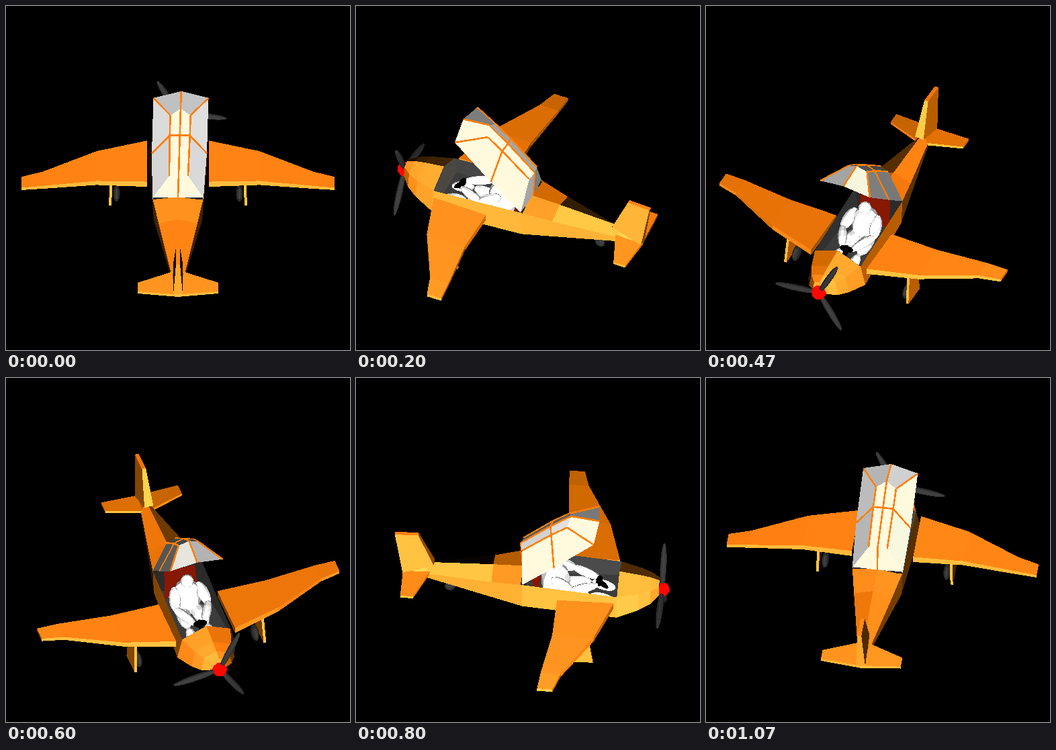
Write an HTML page with a canvas that moves like this. It is 512 px wide and 512 px high and loops after 1140 ms.

```html
<!DOCTYPE html>
<html lang="en">
<head>
<meta charset="utf-8">
<title>Turning plane</title>
<style>
html, body { margin: 0; height: 100%; overflow: hidden; background: #000; }
canvas { display: block; width: 100%; height: 100%; }
</style>
</head>
<body>
<canvas width="512" height="512"></canvas>
<script>
// Points are [x right, f forward, z up]; the camera is orthographic, about 44 degrees up.
const SIZE = 512, LOOP = 1140, STEP_DEG = 22;
const ctx = document.querySelector('canvas').getContext('2d');
const img = ctx.createImageData(SIZE, SIZE);
const pixels = new Uint32Array(img.data.buffer);
const depth = new Float32Array(SIZE * SIZE);
let sin, cos;

const view = ([x, f, z]) => {
  const d = x * sin + f * cos;
  return [256 + x * cos - f * sin, 297 - .7 * d - .714 * z, .7 * z - .714 * d];
};
const sub = (a, b) => a.map((v, i) => v - b[i]);
const cross = (a, b) => [a[1] * b[2] - a[2] * b[1], a[2] * b[0] - a[0] * b[2], a[0] * b[1] - a[1] * b[0]];
const mix = (a, b, k) => a.map((v, i) => v + (b[i] - v) * k);
const unit = v => { const l = Math.hypot(...v); return v.map(n => n / l); };
const byte = v => Math.max(0, Math.min(255, v)) | 0;

// Materials: light 0..1 and whether the inner side shows, giving [r, g, b]
const flat = (...rgb) => () => rgb;
const grey = g => [g, g, g];
const orange = k => [k * 480, 222 * Math.max(0, k) ** .9, (k - .43) * 150];
const hull = (k, inside) => inside ? grey(28 + 60 * k) : orange(k);
const glass = (k, inside) => {
  const g = 38 + 225 * Math.min(1, inside ? k + .3 : k) ** 1.6;
  return [g, Math.min(g, 250), Math.min(g, 222)];
};
const white = k => grey(90 + 290 * k);
const dark = k => grey(18 + 50 * k);
const black = flat(0, 0, 0), red = flat(255, 8, 4), rib = flat(255, 128, 8);

function triangle(a, b, c, color) {
  const area = (b[0] - a[0]) * (c[1] - a[1]) - (b[1] - a[1]) * (c[0] - a[0]);
  if (Math.abs(area) < .01) return;
  const xs = [a[0], b[0], c[0]], ys = [a[1], b[1], c[1]];
  const x1 = Math.min(SIZE - 1, Math.max(...xs)), y1 = Math.min(SIZE - 1, Math.max(...ys));
  for (let y = Math.max(0, Math.floor(Math.min(...ys))); y <= y1; y++) {
    for (let x = Math.max(0, Math.floor(Math.min(...xs))); x <= x1; x++) {
      const px = x + .5, py = y + .5;
      const u = ((px - a[0]) * (c[1] - a[1]) - (py - a[1]) * (c[0] - a[0])) / area;
      const v = ((b[0] - a[0]) * (py - a[1]) - (b[1] - a[1]) * (px - a[0])) / area;
      if (u < 0 || v < 0 || u + v > 1) continue;
      const d = a[2] + u * (b[2] - a[2]) + v * (c[2] - a[2]), at = y * SIZE + x;
      if (d > depth[at]) { depth[at] = d; pixels[at] = color; }
    }
  }
}

function fill(v, rgb) {
  const [r, g, b] = rgb.map(byte);
  const color = (255 << 24 | b << 16 | g << 8 | r) >>> 0;
  for (let i = 2; i < v.length; i++) triangle(v[0], v[i - 1], v[i], color);
}

// The light stands a little below the camera
function face(points, material) {
  const v = points.map(view);
  const n = cross(sub(v[2], v[0]), sub(v[v.length - 1], v[1]));
  const len = Math.hypot(...n);
  if (len < .01) return;
  const light = (n[1] * .2 + n[2] * .98) * Math.sign(n[2]) / len;
  fill(v, material(Math.max(0, light), n[2] < 0));
}

function line(p, q, width, material) {
  const a = view(p), b = view(q);
  const dx = b[0] - a[0], dy = b[1] - a[1], k = width / 2 / (Math.hypot(dx, dy) || 1);
  const off = ([x, y, d], s) => [x - dy * k * s, y + dx * k * s, d + 2.5];
  fill([off(a, 1), off(b, 1), off(b, -1), off(a, -1)], material());
}

// Skin stretched over a row of rings
function loft(rings, material, closed = true) {
  for (let i = 1; i < rings.length; i++) {
    const a = rings[i - 1], b = rings[i], n = a.length;
    for (let j = 0; j < n - !closed; j++) {
      const k = (j + 1) % n;
      face([a[j], a[k], b[k], b[j]], material);
    }
  }
}

function solid(rings, material) {
  loft(rings, material);
  face(rings[0], material);
  face(rings[rings.length - 1], material);
}

// Ellipsoid from a to b
function blob(a, b, r, material, sides = 10) {
  const dir = unit(sub(b, a));
  const u = unit(cross(dir, Math.abs(dir[2]) > .9 ? [1, 0, 0] : [0, 0, 1])), w = cross(dir, u);
  const rings = Array.from({ length: 8 }, (_, i) => {
    const phi = i / 7 * Math.PI, c = mix(a, b, (1 - Math.cos(phi)) / 2);
    return Array.from({ length: sides }, (_, j) => {
      const t = j / sides * 2 * Math.PI;
      return c.map((v, m) => v + r * Math.sin(phi) * (u[m] * Math.cos(t) + w[m] * Math.sin(t)));
    });
  });
  loft(rings, material);
}

// Hull cross-section: the nose swells quickly, the tail tapers evenly
function section(f) {
  const nose = f > 0;
  const k = nose ? ((200 - f) / 63) ** .45 : (f + 200) / 195;
  const w = 38 * k, low = w * (nose ? 1.2 : .95), base = -25 * k;
  const sill = nose ? 10 : 21 * k ** 1.6;
  const ridge = nose ? 10 + 17 * k : 24 * k ** .25;
  return [[0, f, ridge], [w, f, sill], [low, f, base], [-low, f, base], [-w, f, sill]];
}

function body() {
  const front = section(137), back = section(-5);
  loft([197, 185, 168, 137].map(section), hull);
  loft([front, back].map(r => r.slice(1)), hull, false);
  loft([-5, -52, -150, -185].map(section), hull);
  face(section(197), orange);
  face(front.map(([x, f, z]) => [x, f - 1, z - 1]), flat(74, 72, 64));
  face(back.map(([x, f, z]) => [x, f + 1, z - 1]), flat(45, 42, 42));
}

function wings() {
  for (const side of [-1, 1]) {
    const skin = k => orange(k - side * sin * .09);
    const rib = (x, lead, trail, zl, zt, thick) => [
      [side * x, lead, zl], [side * x, trail, zt],
      [side * x, trail, zt - thick], [side * x, lead, zl - thick]
    ];
    const station = (x, lead, trail) => {
      const t = x / 233, z = 5 * (1 - t ** 4);
      return rib(x, lead, trail, z, z - 3 * (1 - t), 12 - 7 * t);
    };
    solid([station(46, 133, 48), station(121, 111, 49), station(201, 70, 40), station(233, 61, 38)], skin);
    solid([rib(0, -143, -187, 6, -2, 5), rib(60, -166, -185, 2, 2, 4)], skin);
  }
}

function fin() {
  const ring = (w, lead, zl, trail, zt) =>
    [[w, lead, zl], [w, trail, zt], [-w, trail, zt], [-w, lead, zl]];
  solid([ring(7, -140, 17, -187, -2), ring(3, -164, 74, -199, 72)], orange);
}

function gear() {
  for (const side of [-1, 1]) {
    const leg = x => [[side * x, 99, -6], [side * (x + 2), 108, -66],
      [side * (x + 2), 69, -68], [side * x, 75, -6]];
    solid([leg(97), leg(101)], orange);
    blob([side * 86, 88, -60], [side * 97, 88, -60], 13, dark);
  }
  blob([-4, -117, -30], [4, -117, -30], 8, dark);
}

function propeller() {
  const hub = [0, 201, -4];
  for (let i = 0; i < 3; i++) {
    const t = (i * 124 - 9) * Math.PI / 180;
    blob(hub, [74 * Math.cos(t), 201, 74 * Math.sin(t) - 4], 5, dark);
  }
  blob([0, 201, -15], [0, 201, 7], 11, red);
}

function pilot() {
  face([[-26, 16, -22], [26, 16, -22], [24, 7, 26], [-24, 7, 26]], flat(135, 24, 2));
  blob([0, 40, -34], [0, 43, 32], 22, white);
  blob([0, 44, 23], [0, 44, 44], 10, white);
  for (const s of [-1, 1]) {
    const elbow = [s * 26, 70, 2], knee = [s * 15, 94, -12];
    blob([s * 18, 36, 20], elbow, 9, white);
    blob([s * 28, 62, 4], [s * 7, 107, 3], 7, white);
    blob([s * 9, 36, -20], knee, 11, white);
    blob(knee, [s * 13, 130, -22], 8, white);
  }
  blob([-11, 107, 4], [11, 107, 4], 5, black);
  blob([0, 102, 8], [0, 120, -10], 4, black);
}

// Canopy: u runs along its length from the hinge, n stands off its frame
const lid = ([x, u, n]) => [x + u * .03, -5 + .73 * u - .69 * n, 21 + .69 * u + .73 * n];
function arch(u, top, half, n, peak = 0) {
  const w = 38 + Math.min(u, 66) / 22;
  return [[-w, u, 0], [-half, top, n], [0, top + peak, n + 4], [half, top, n], [w, u, 0]].map(lid);
}
const arches = [
  arch(0, 0, 38, 0), arch(0, 31, 14, 37), arch(66, 91, 15, 36),
  arch(148, 121, 15, 33, 10), arch(148, 148, 41, 0, 10)
];

function canopy() {
  // Drawn right to left, so that the outer side counts as outside
  loft(arches.map(a => [...a]), glass, false);
  for (let i = 1; i < arches.length; i++) {
    const a = arches[i - 1], b = arches[i];
    for (let j = 1; j < 4; j++)
      if (i > 1 || j === 2) line(a[j], b[j], 2.6, rib);
  }
  for (let j = 1; j < 5; j++) line(arches[2][j - 1], arches[2][j], 2.6, rib);
  line(lid([-37, -1, 0]), lid([37, -1, 0]), 3, flat(38, 38, 52));
}

function draw(step) {
  const yaw = step * STEP_DEG * Math.PI / 180;
  sin = Math.sin(yaw);
  cos = Math.cos(yaw);
  pixels.fill(0xff000000);
  depth.fill(-1e9);
  for (const part of [body, wings, fin, gear, propeller, pilot, canopy]) part();
  ctx.putImageData(img, 0, 0);
}

// Fifteen poses a second, each change rounded to 10 ms
let shown = -1;
function tick() {
  const t = Math.floor(performance.now() % LOOP / 10);
  const step = Math.min(16, Math.floor((t + .5) * 3 / 20));
  if (step !== shown) draw(shown = step);
  requestAnimationFrame(tick);
}
tick();
</script>
</body>
</html>
```
